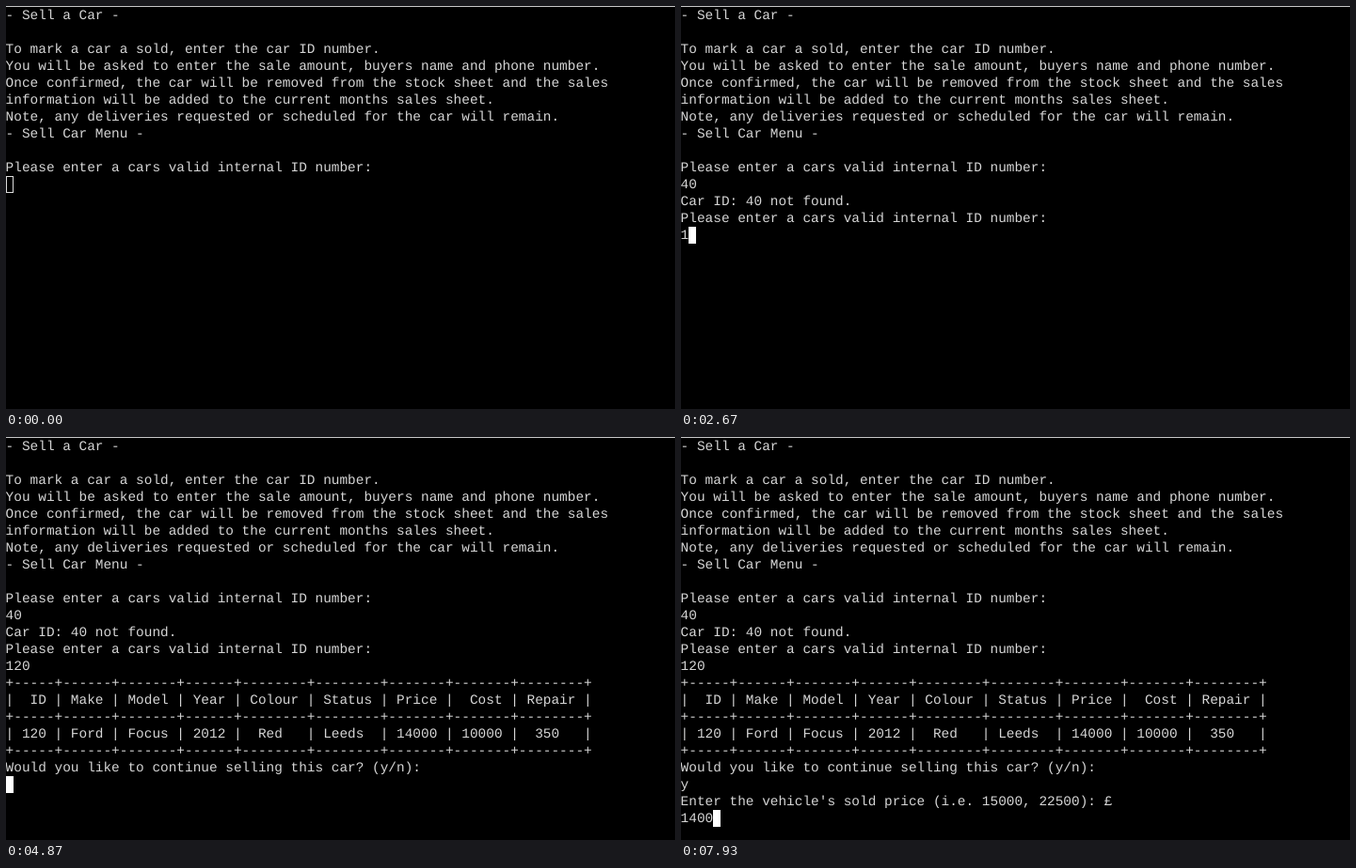
These frames come from a looping animation (711x429 px, 8 s). An HTML page:

```html
<!DOCTYPE html>
<html lang="en">
<head>
<meta charset="utf-8">
<title>Sell a Car</title>
<style>
  html, body { margin: 0; width: 100%; height: 100%; overflow: hidden; background: #000; }
  body { position: relative; }
  #edge { position: absolute; top: 0; left: 0; right: 0; height: 1px; background: #c8c8c8; }
  #screen {
    position: absolute; top: 2px; left: -.4px; margin: 0; color: #d6d6d6;
    font: 14.43px/18px "Courier New", "Liberation Mono", monospace;
    text-rendering: geometricPrecision;
  }
  #cursor { position: absolute; left: 0; top: 0; width: 8px; height: 18px; box-sizing: border-box; background: #fff; }
  #cursor.idle { background: none; border: 1px solid #dcdcdc; }
  #mouse { position: absolute; left: 0; top: 0; }
</style>
</head>
<body>
<div id="edge"></div>
<pre id="screen"></pre>
<div id="cursor"></div>
<svg id="mouse" width="12" height="18">
  <path d="M.5 .5V14L3.7 11.2 5.8 16 8 15 5.9 10.3H10.5Z" fill="#fff"/>
</svg>
<script>
const LOOP = 8000, CELL = 8.66, ROW = 18;
const FOCUS = 410, MOUSE_IN = 110, MOUSE_OUT = 2250;
const $ = id => document.getElementById(id);
const screen = $("screen"), cursor = $("cursor"), mouse = $("mouse");

const rule = "+" + [5, 6, 7, 6, 8, 8, 7, 7, 8].map(n => "-".repeat(n) + "+").join("") + "\n";
const ask = "Please enter a cars valid internal ID number:\n";
const intro = `- Sell a Car -

To mark a car a sold, enter the car ID number.
You will be asked to enter the sale amount, buyers name and phone number.
Once confirmed, the car will be removed from the stock sheet and the sales
information will be added to the current months sales sheet.
Note, any deliveries requested or scheduled for the car will remain.
- Sell Car Menu -

`;
const table = rule +
  "|  ID | Make | Model | Year | Colour | Status | Price |  Cost | Repair |\n" + rule +
  "| 120 | Ford | Focus | 2012 |  Red   | Leeds  | 14000 | 10000 |  350   |\n" + rule;

// [time in ms, text added to the terminal]
const output = [
  [0, intro + ask],
  [660, "4"], [830, "0"], [1050, "\n"],
  [1340, "Car ID: 40 not found.\n" + ask],
  [2400, "1"], [2700, "2"], [2840, "0"], [3030, "\n"],
  [3280, table + "Would you like to continue selling this car? (y/n):\n"],
  [4950, "y"],
  [5100, "\nEnter the vehicle's sold price (i.e. 15000, 22500): £\n"],
  [6990, "1"], [7240, "4"], [7540, "0"], [7750, "0"]
];

const move = (el, x, y) => el.style.transform = `translate(${x}px, ${y}px)`;

function draw(now) {
  const t = now % LOOP;
  const text = output.filter(([at]) => at <= t).map(([, s]) => s).join("");
  if (screen.textContent !== text) screen.textContent = text;

  const lines = text.split("\n");
  move(cursor, Math.floor(lines.at(-1).length * CELL), 1 + (lines.length - 1) * ROW);
  cursor.className = t < FOCUS ? "idle" : "";

  const p = Math.min(1, Math.max(0, (t - FOCUS) / 500));
  const ease = p * p * (3 - 2 * p);
  move(mouse, 289, 258 - 10 * ease);
  mouse.style.display = t >= MOUSE_IN && t < MOUSE_OUT ? "block" : "none";

  requestAnimationFrame(draw);
}
draw(performance.now());
</script>
</body>
</html>
```
